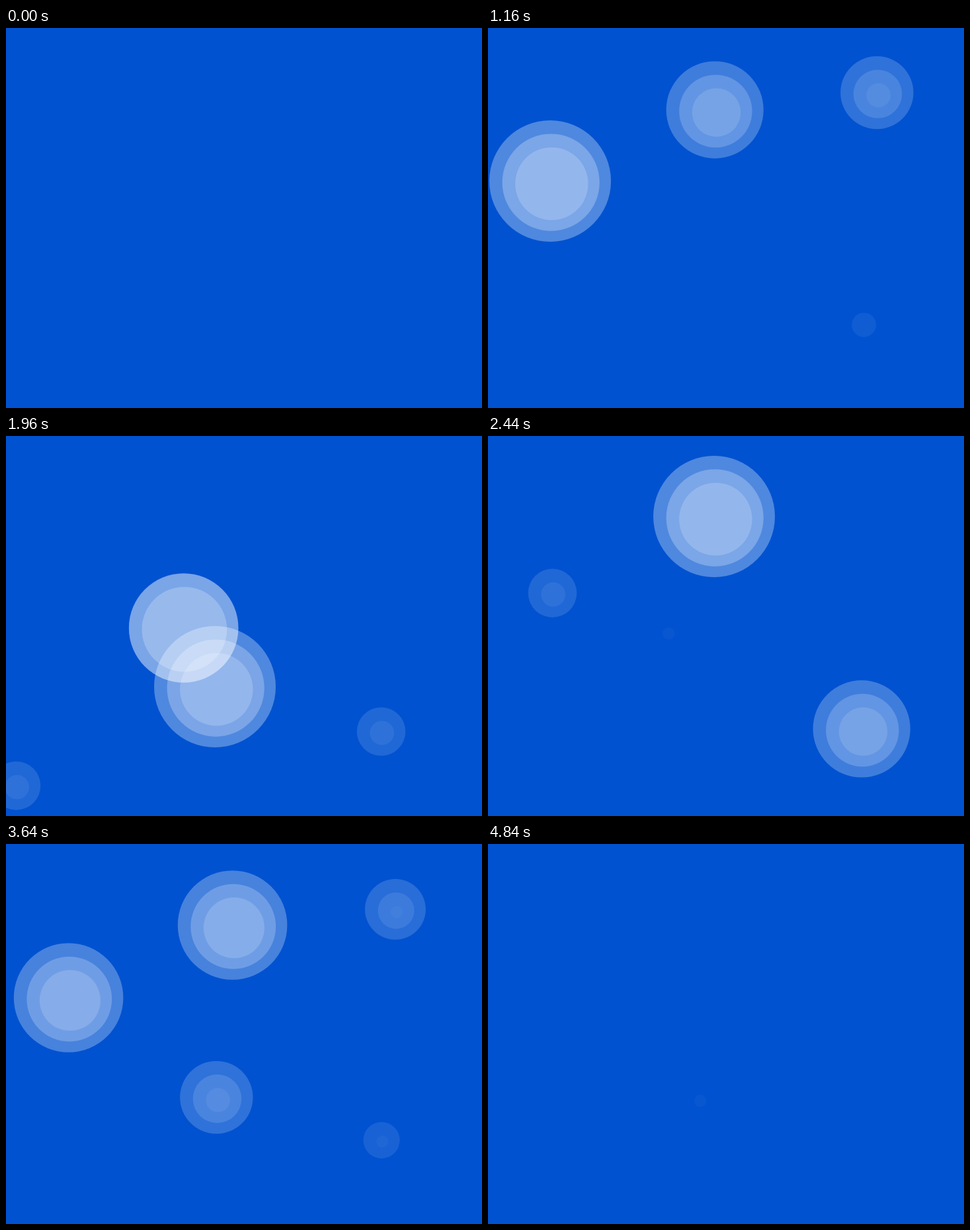
Recreate the animation shown at these times as an HTML page with a canvas. Size 720 by 576 pixels, loop 4.92 s.

```html
<!DOCTYPE html>
<html lang="en">
<head>
<meta charset="utf-8">
<title>Ripples</title>
<style>
  html, body { margin: 0; height: 100%; overflow: hidden; background: #0052d0; }
  canvas { display: block; }
</style>
</head>
<body>
<canvas id="stage" width="720" height="576"></canvas>
<script>
const ctx = document.getElementById('stage').getContext('2d');
const LOOP = 4920, TICK = 40, LAST_TICK = 121;
const GROW = 10;                 // ticks from nothing to full size, and back again
const STAGGER = 2;               // ticks between the rings of one ripple
const MAX_RADIUS = 92, MAX_ALPHA = 0.31;
const DRIFT_X = -5.8, DRIFT_Y = -10.2;
const REPEATS = [0, 38, 63];     // ticks after a ripple's first start

const ripples = [
  { x: 273.9, y: 300.2, start: 0 },
  { x: 569.8, y: 452.1, start: 7 },
  { x: 347.8, y: 132.2, start: 13 },
  { x: 99.8, y: 242.2, start: 19 },
  { x: 591.8, y: 104.1, start: 23 },
  { x: 17.8, y: 534.2, start: 29 },
  { x: 321.8, y: 390.2, start: 35 },
];

function drawRing(x, y, age) {
  const size = 1 - Math.abs(age - GROW) / GROW;
  if (size <= 0) return;
  ctx.fillStyle = `rgba(255, 255, 255, ${MAX_ALPHA * size})`;
  ctx.beginPath();
  ctx.arc(x + DRIFT_X * size, y + DRIFT_Y * size, MAX_RADIUS * size, 0, 2 * Math.PI);
  ctx.fill();
}

function draw(time) {
  const tick = Math.min(Math.floor((time % LOOP) / TICK), LAST_TICK);
  ctx.fillStyle = '#0052d0';
  ctx.fillRect(0, 0, 720, 576);
  if (tick < 2) return;          // the loop opens on a short blank hold
  for (const { x, y, start } of ripples)
    for (const repeat of REPEATS)
      for (let ring = 0; ring < 3; ring++)
        drawRing(x, y, tick - start - repeat - ring * STAGGER);
}

const begin = performance.now();
function frame() {
  draw(performance.now() - begin);
  requestAnimationFrame(frame);
}
frame();
</script>
</body>
</html>
```
